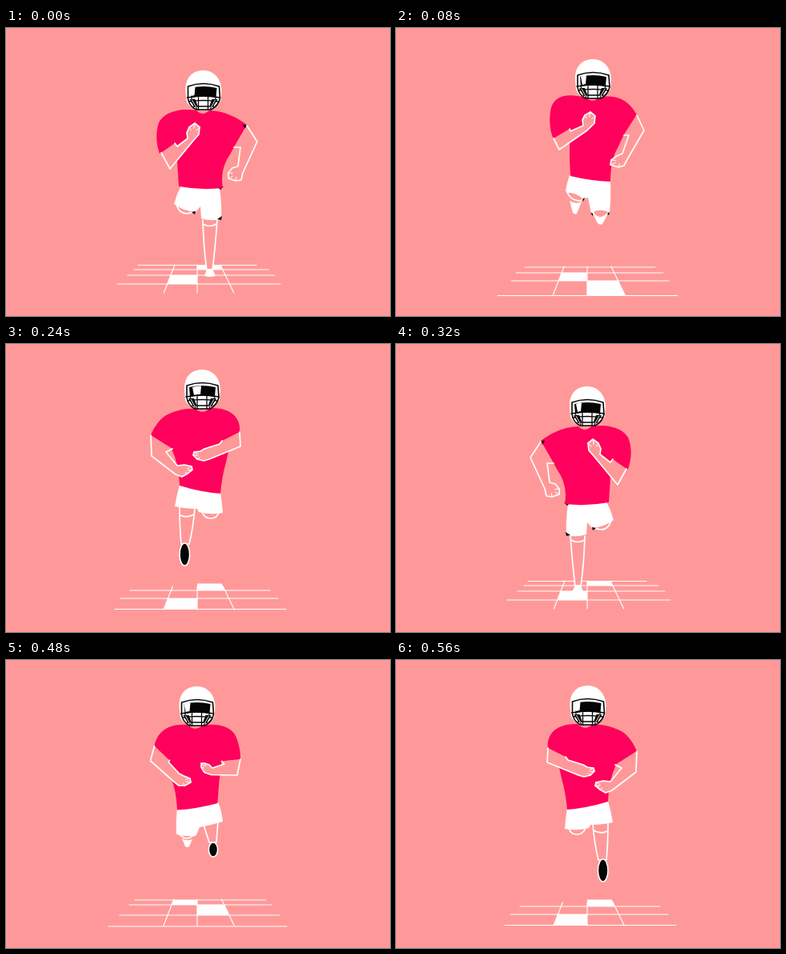
Animation of 480x360 px, one loop 640 ms. Source, as an HTML page with a canvas:

```html
<!DOCTYPE html>
<html lang="en">
<head>
<meta charset="utf-8">
<title>Running player</title>
<style>
html, body { margin: 0; width: 100%; height: 100%; overflow: hidden; background: #ff9999; }
canvas { display: block; width: 480px; height: 360px; }
</style>
</head>
<body>
<canvas id="stage" width="480" height="360"></canvas>
<script>
const ctx = document.getElementById('stage').getContext('2d');
const SKIN = '#ff9999', SHIRT = '#ff005c', WHITE = '#fff', BLACK = '#050505';
const STEP = 80, STEPS = 8, MIRROR = 482;

const mix = (a, b) => (a + b) / 2;
const mixPoints = (p, q) => p.map(([x, y], i) => [mix(x, q[i][0]), mix(y, q[i][1])]);
function mixPath(a, b) {
  const nums = b.match(/\d+/g);
  let i = 0;
  return a.replace(/\d+/g, n => mix(+n, +nums[i++]));
}

function draw(d, fill, stroke, width = 1.7) {
  const path = new Path2D(d);
  if (fill) { ctx.fillStyle = fill; ctx.fill(path); }
  if (stroke) { ctx.strokeStyle = stroke; ctx.lineWidth = width; ctx.stroke(path); }
}
const limb = d => draw(d, SKIN, WHITE);
const white = d => draw(d, WHITE);
const black = d => draw(d, BLACK);

function sole(x, y, rx, ry) {
  ctx.beginPath();
  ctx.ellipse(x, y, rx, ry, 0, 0, 7);
  ctx.fillStyle = BLACK;
  ctx.fill();
  ctx.strokeStyle = WHITE;
  ctx.lineWidth = 1.6;
  ctx.stroke();
}

// Arm points: sleeve, elbow, wrist, five around the hand, wrist, inner elbow, sleeve
const land = {
  shirt: 'M238 103 C215 99 193 107 190 122 C187 134 188 145 192 157 L213 145 Q214 170 216 198 Q243 203 271 200 Q267 177 280 158 L285 149 L301 121 C290 113 276 104 254 103 Q246 111 238 103Z',
  arms: [
    [[194, 156], [205, 176], [234, 141], [241, 133], [242, 124], [236, 119], [229, 124], [226, 131], [227, 138], [214, 148], [211, 144]],
    [[301, 122], [314, 142], [296, 181], [294, 190], [287, 191], [278, 188], [278, 181], [283, 175], [290, 173], [293, 149], [285, 149]]
  ],
  legs() {
    limb('M213 220 Q216 232 226 232 Q234 231 236 228');
    limb('M246 240 Q247 275 251 303 H258 Q262 270 264 240');
    limb('M246 245 Q255 250 263 245');
    white('M251 301 H258 L262 310 Q255 312 248 310Z');
    white('M219 197 Q213 208 210 220 Q222 229 237 230 L243 223 L244 238 Q256 242 269 239 Q270 220 267 200Z');
    black('M232 230 L237 229 L236 233Z M264 239 L270 235 L269 240Z M265 199 L272 198 L268 202Z');
  },
  shade: 'M296 121 L301 121 L299 126Z'
};

const rise = {
  shirt: 'M237 87 C214 81 196 84 193 104 C191 118 193 130 197 139 L218 126 Q216 155 218 185 Q243 191 268 192 Q268 165 277 150 L285 133 L301 108 C292 94 282 83 255 86 Q246 95 237 87Z',
  arms: [
    [[197, 138], [204, 152], [239, 128], [248, 119], [249, 110], [243, 105], [236, 109], [233, 115], [234, 122], [218, 129], [217, 126]],
    [[301, 109], [310, 128], [288, 166], [285, 172], [278, 174], [268, 171], [269, 165], [276, 160], [283, 157], [291, 134], [285, 134]]
  ],
  legs() {
    white('M217 184 Q213 196 212 204 Q222 208 236 213 L240 212 Q242 222 244 231 Q255 229 267 231 Q269 212 268 191Z');
    limb('M214 205 Q218 216 231 216 L234 213 Q226 205 214 205Z');
    white('M217 216 Q225 221 232 217 L226 232 Q224 234 221 231Z');
    limb('M246 229 Q255 225 266 229 Q262 237 255 237 Q248 236 246 229Z');
    white('M247 234 Q256 241 264 234 L258 245 Q255 247 252 244Z');
    black('M233 214 L236 212 L234 217Z M243 231 L246 232 L246 235Z M267 230 L264 232 L266 234Z');
  }
};

const fall = {
  shirt: 'M237 81 C222 79 203 86 196 92 C190 97 184 106 181 114 L207 131 Q216 150 217 177 Q243 185 268 187 Q270 165 275 148 L279 130 L292 110 C294 95 284 79 255 80 Q246 89 237 81Z',
  arms: [
    [[181, 114], [182, 140], [212, 163], [220, 166], [227, 162], [233, 157], [232, 153], [223, 151], [214, 152], [200, 135], [208, 131]],
    [[292, 110], [293, 128], [254, 144], [247, 146], [239, 144], [234, 139], [235, 135], [243, 134], [248, 131], [267, 125], [270, 121]]
  ],
  legs() {
    limb('M217 203 Q217 230 219 250 H229 Q234 230 236 205');
    limb('M218 214 Q226 218 235 213');
    limb('M245 210 Q248 218 256 218 Q264 218 266 210');
    sole(223.3, 263, 6.3, 14);
    white('M217 176 Q213 190 211 203 Q224 206 239 206 L241 210 Q256 214 271 211 Q270 198 268 185Z');
  }
};

const peak = {
  dy: -2,
  shirt: mixPath(rise.shirt, fall.shirt),
  arms: rise.arms.map((arm, i) => mixPoints(arm, fall.arms[i])),
  legs() {
    limb('M217 203 L219 230 H228 L235 208');
    limb('M246 219 Q256 231 266 219');
    white('M249 226 Q256 229 262 225 L258 235 Q255 237 253 235Z');
    sole(223, 239, 5.6, 9);
    white('M217 179 Q212 192 211 204 Q224 208 240 211 Q243 219 245 222 Q257 223 269 220 Q270 203 268 186Z');
  }
};

const poses = [land, rise, peak, fall];

// Head place per step: centre, top, left edge and width of the reflection
const heads = [
  [246.5, 53, -17, 7], [246, 39, -15, 7], [245.5, 33, -14, 9], [245, 32, -12, 11],
  [239, 53, -14, 7], [237.5, 39, -15, 7], [238.5, 33, -16, 8], [239.5, 32, -17, 8]
];

// Floor per step: lines as y, left, right; tiles as side, top, bottom
const floors = [
  { lines: [[296.5, 165, 313], [302, 160, 328], [309, 152, 336], [320, 139, 343]],
    tiles: [[1, 296, 302], [-1, 309, 320]], span: [296, 331] },
  { lines: [[299, 161, 324], [306, 150, 334], [316, 144, 341], [334.5, 127, 352]],
    tiles: [[-1, 306, 316], [1, 316, 334]], span: [298, 334] },
  { lines: [[300, 161, 325], [306, 154, 332], [319, 142, 342], [333, 128, 351]],
    tiles: [[-1, 300, 306], [1, 306, 319]], span: [299, 333] },
  { lines: [[308, 155, 330], [318, 143, 340], [331.5, 136, 350]],
    tiles: [[1, 299.5, 308], [-1, 318, 331]], span: [303, 332] }
];
const railX = (side, y) =>
  side < 0 ? 211 - 0.39 * (y - 296) : side > 0 ? 268 + 0.48 * (y - 296) : 239;

function drawFloor({ lines, tiles, span: [top, bottom] }) {
  let d = '';
  for (const [y, x0, x1] of lines) d += `M${x0} ${y}H${x1}`;
  for (const side of [-1, 0, 1]) d += `M${railX(side, top)} ${top}L${railX(side, bottom)} ${bottom}`;
  draw(d, null, WHITE, 1.15);
  for (const [side, y0, y1] of tiles)
    white(`M239 ${y0}L${railX(side, y0)} ${y0}L${railX(side, y1)} ${y1}L239 ${y1}Z`);
}

function drawArm(points) {
  limb('M' + points.map(p => p.join(' ')).join('L'));
  // finger creases
  const [cx, cy] = [mix(points[3][0], points[7][0]), mix(points[3][1], points[7][1])];
  let d = '';
  for (const i of [4, 5, 6]) {
    const [x, y] = points[i];
    d += `M${x} ${y}L${x + (cx - x) * 0.5} ${y + (cy - y) * 0.5}`;
  }
  draw(d, null, WHITE, 1);
}

function drawHead([cx, top, glare, width]) {
  ctx.save();
  ctx.translate(cx, top);
  white('M-22 26 C-23 9 -13 0 0 0 C13 0 23 10 23 26 L22 38 Q17 46 9 48 H-9 Q-19 45 -21 38Z');
  draw('M-19 20 Q0 13 20 20 L21 35 Q19 44 10 49 H-9 Q-18 44 -19 35Z', WHITE, BLACK, 1.6);
  black('M-16 22 Q0 18 17 22 L16 34 Q0 31 -15 34Z');
  black('M-17 36 H-10 L-7 44 L-11 46Z M18 36 H11 L8 44 L12 46Z');
  white(`M${glare} 22 Q${glare + width / 2} 20 ${glare + width} 20.5 L${glare + width - 1} 31 L${glare + 2} 32Z`);
  draw('M-20 34 Q0 30 21 34 M-18 39 Q0 36 19 39 M-12 45 H13 M-6 32 V49 M6 32 V49 M-15 34 L-8 48 M16 34 L9 48', null, BLACK, 1.3);
  draw('M-14 37 L-9 46 M15 37 L10 46', null, WHITE, 0.9);
  ctx.restore();
}

function drawBody(pose) {
  ctx.translate(0, pose.dy || 0);
  pose.legs();
  draw(pose.shirt, SHIRT);
  if (pose.shade) black(pose.shade);
  pose.arms.forEach(drawArm);
}

ctx.lineJoin = ctx.lineCap = 'round';

function render() {
  const step = Math.floor(performance.now() / STEP) % STEPS;
  ctx.fillStyle = SKIN;
  ctx.fillRect(0, 0, 480, 360);
  drawFloor(floors[step % 4]);
  ctx.save();
  if (step >= 4) ctx.transform(-1, 0, 0, 1, MIRROR, 0);
  drawBody(poses[step % 4]);
  ctx.restore();
  drawHead(heads[step]);
  requestAnimationFrame(render);
}
render();
</script>
</body>
</html>
```
